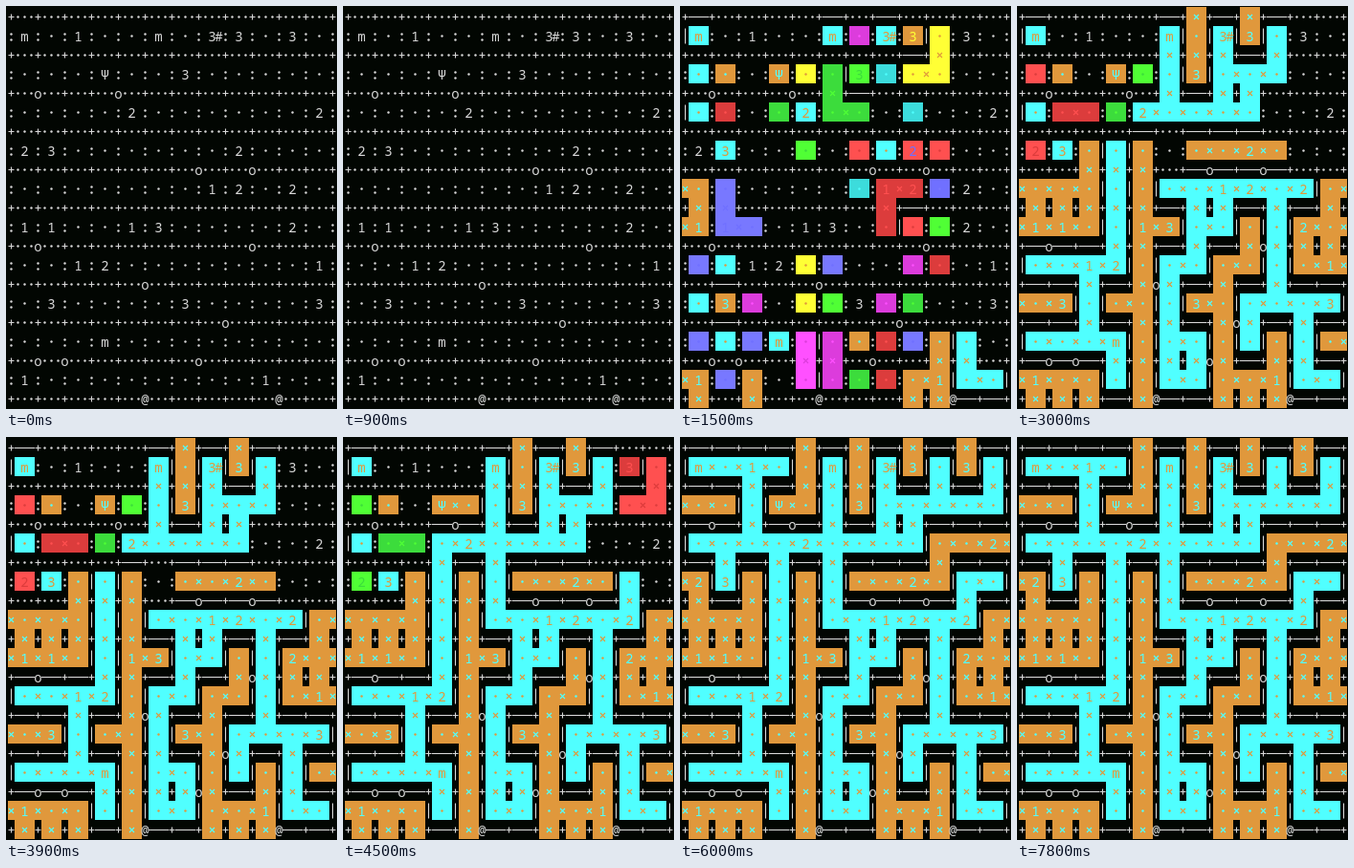
Recreate the animation shown at these times as an HTML page. Size 346 px wide and 422 px high, loop 9 s.

```html
<!DOCTYPE html>
<html lang="en">
<head>
<meta charset="utf-8">
<title>Loop puzzle</title>
<style>
html, body { margin: 0; width: 100%; height: 100%; overflow: hidden; background: #020602; }
svg { display: block; width: 346px; height: 422px; }
text {
  font: 14px "Noto Sans Mono", "Liberation Mono", monospace;
  font-stretch: extra-condensed;
  text-anchor: middle;
}
</style>
</head>
<body>
<svg id="stage" viewBox="0 0 346 422"></svg>
<script>
const COLS = 12, ROWS = 10, CHAR_W = 7, LINE_H = 20;
const STEP = 1500, LOOP = 9000;
const INK = '#d8d8d8';

// Each group colour, with the ink used on top of it.
const FILL = {
  C: '#50ffff', O: '#e0983c', R: '#dc3c3c', S: '#ff5050', G: '#3cdc3c', L: '#50ff35',
  Y: '#ffff35', K: '#e0983c', B: '#7878ff', N: '#7070ff', M: '#dc3cdc', P: '#ff50ff',
  T: '#3cdcdc', V: '#ff5050'
};
const OPPOSITE = {
  C: 'O', O: 'C', R: 'S', S: 'R', G: 'L', L: 'G', Y: 'K', K: 'Y',
  B: 'N', N: 'B', M: 'P', P: 'M', T: 'C', V: 'N'
};

const CLUES = [
  'm.1..m.#3.3.', '...Ψ..3.....', '....2......2', '23......2...', '.......12.2.',
  '11..13....2.', '..12.......1', '.3....3....3', '...m........', '1........1..'
];
const MARKS = {
  '1,2': 'o', '4,2': 'o', '7,4': 'o', '9,4': 'o', '1,6': 'o', '9,6': 'o', '5,7': 'o',
  '8,8': 'o', '1,9': 'o', '2,9': 'o', '7,9': 'o', '5,10': '@', '10,10': '@'
};

// Capitals merge with equal neighbours and are walled off from opposites;
// lower case cells stand alone.
const LOWER = [
  'OOOCOCCCCCCO', 'OOOCOOCCOCOO', 'CCCCOCCOOCOO',
  'OOCOOCOOCCCC', 'CCCCOCCOCOCO', 'OOOCOCCOOOCC'
];
const STATES = [
  Array(ROWS).fill('.'.repeat(COLS)),
  ['C....CmCKY..', 'co.oyGLtYY..', 'Cr.gcGG.t...', '.c..l.scvs..', 'OB....tRRn..',
   'OBB....RSl..', 'bC..yb..mr..', 'cOm.yl.mg...', 'bCbcPMorbOC.', 'ObO.PMgrOOCC'],
  ['C....COCOC..', 'so.olCOCCC..', 'CRRgCCCCC...', 'scOCO.OOOO..', ...LOWER],
  ['C....COCOCRS', 'lo.OOCOCCCSS', 'CGGCCCCCC...', 'lcOCOCOOOOC.', ...LOWER],
  ['CCCCOCOCOCOC', 'OOCOOCOCCCCC', 'CCCCCCCCCOOO', 'OCOCOCOOOOCC', ...LOWER]
];

const rect = (x, y, w, h, fill) =>
  `<rect x="${x}" y="${y}" width="${w}" height="${h}" fill="${fill}"/>`;
const dot = (x, y, ink) => `<circle cx="${x}" cy="${y}" r="1.2" fill="${ink}"/>`;
const glyph = (x, y, s, ink) => `<text x="${x}" y="${y + 5}" fill="${ink}">${s}</text>`;
const stroke = (d, ink) => `<path d="${d}" stroke="${ink}" stroke-width="1.1" fill="none"/>`;
const cross = (x, y, ink) => stroke(`M${x - 2.5} ${y - 2.5}l5 5m0-5l-5 5`, ink);
const plus = (x, y) => stroke(`M${x - 3} ${y}h6m-3-3v6`, INK);

const charX = i => 5.5 + CHAR_W * i;
const lineY = k => 11.5 + LINE_H * k;
const block = (i, k, chars, fill) =>
  rect(2 + CHAR_W * i, 1 + LINE_H * k, CHAR_W * chars, LINE_H, fill);
const inkOn = code => FILL[OPPOSITE[code.toUpperCase()]];

function relation(a, b) {
  if (!FILL[a] || !FILL[b]) return 'unknown';
  if (a === b) return 'open';
  return OPPOSITE[a] === b ? 'wall' : 'unknown';
}

function drawCell(c, r, code) {
  const i = 4 * c + 2, k = 2 * r + 1, x = charX(i), y = lineY(k);
  const known = code !== '.', clue = CLUES[r][c];
  const ink = known ? inkOn(code) : INK;
  let out = known ? block(i - 1, k, 3, FILL[code.toUpperCase()]) : '';
  if (clue === '.') return out + dot(x, y, ink);
  out += glyph(x, y, clue === '#' ? 3 : clue, ink);
  return clue === '#' ? out + glyph(x + CHAR_W, y, '#', ink) : out;
}

function drawEdge(i, k, a, b, across) {
  const x = charX(i), y = lineY(k), kind = relation(a, b);
  if (kind === 'open') {
    return block(across ? i - 1 : i, k, across ? 3 : 1, FILL[a]) + cross(x, y, inkOn(a));
  }
  if (kind === 'wall') {
    return stroke(across ? `M${x - 10.5} ${y}h21` : `M${x} ${y - 8}v16`, INK);
  }
  return across
    ? [-CHAR_W, 0, CHAR_W].map(d => dot(x + d, y, INK)).join('')
    : dot(x, y - 2, INK) + dot(x, y + 4, INK);
}

function drawBoard(state) {
  const at = (c, r) =>
    c < 0 || r < 0 || c >= COLS || r >= ROWS ? 'O' : state[r][c];
  let out = '';
  for (let r = 0; r <= ROWS; r++) {
    for (let c = 0; c <= COLS; c++) {
      const mark = MARKS[c + ',' + r], x = charX(4 * c), y = lineY(2 * r);
      out += mark ? glyph(x, y, mark, INK) : plus(x, y);
      if (c < COLS) out += drawEdge(4 * c + 2, 2 * r, at(c, r - 1), at(c, r), true);
      if (r < ROWS) out += drawEdge(4 * c, 2 * r + 1, at(c - 1, r), at(c, r), false);
      if (c < COLS && r < ROWS) out += drawCell(c, r, at(c, r));
    }
  }
  return out;
}

const stage = document.getElementById('stage');
stage.innerHTML = STATES.map(s => `<g display="none">${drawBoard(s)}</g>`).join('');
const boards = [...stage.children];
let shown = -1;

function render(ms) {
  const index = Math.min(Math.floor((ms % LOOP) / STEP), STATES.length - 1);
  if (index === shown) return;
  shown = index;
  boards.forEach((g, n) => g.setAttribute('display', n === index ? 'inline' : 'none'));
}

const start = performance.now();
function tick() {
  render(performance.now() - start);
  requestAnimationFrame(tick);
}
tick();
</script>
</body>
</html>
```
